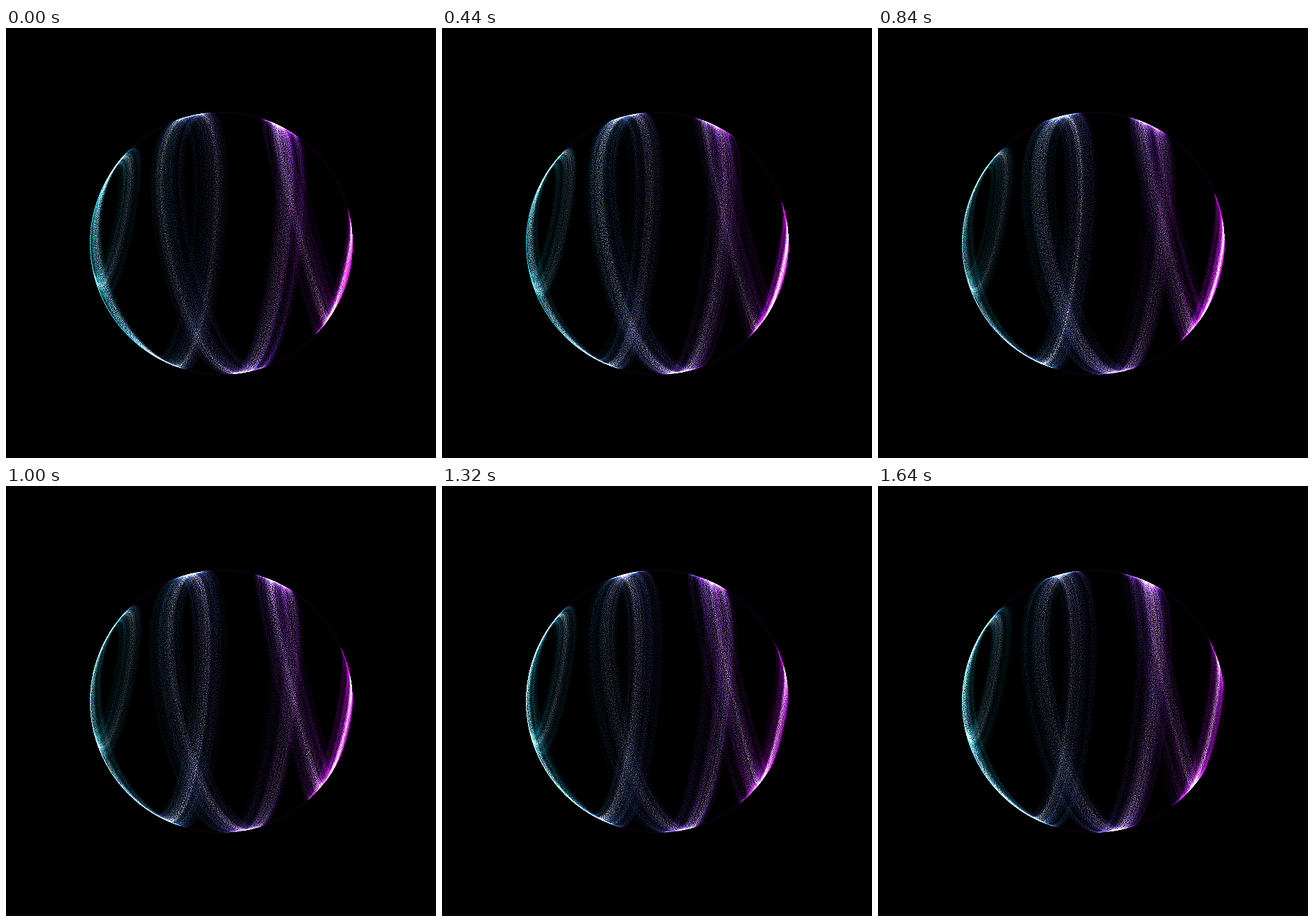
An HTML page with a canvas for the animation above (1680 ms loop, 620 by 620 pixels).

```html
<!DOCTYPE html>
<html lang="en">
<head>
<meta charset="utf-8">
<title>Particle sphere</title>
<style>
html, body { margin: 0; width: 100%; height: 100%; overflow: hidden; background: #000; }
canvas { display: block; }
</style>
</head>
<body>
<canvas id="stage" width="620" height="620"></canvas>
<script>
const SIZE = 620, CENTER = 310, RADIUS = 189, LOOP = 1680, STEP = 40;
const STRANDS = 52, SAMPLES = 300, GAIN = .5;
const ctx = document.getElementById('stage').getContext('2d');
const image = ctx.createImageData(SIZE, SIZE);
const light = new Float32Array(SIZE * SIZE * 3);

// A ribbon winds round the sphere and meets the rim at these angles,
// in turn below and above the middle. Bulges lean right (+) or left (-).
const rimAngles = [165, 142, 114, 103, 78, 63, 34, 5];
const bulges = [.4, -.6, .3, -.46, .24, -.08, .16];

let seed;
function random() {
  seed = (Math.imul(seed, 1664525) + 1013904223) >>> 0;
  return seed / 4294967296;
}

function plot(x, y, r, g, b) {
  const scale = RADIUS / Math.max(1, Math.hypot(x, y));
  const k = 3 * (Math.round(CENTER + y * scale) * SIZE + Math.round(CENTER + x * scale));
  light[k] += r;
  light[k + 1] += g;
  light[k + 2] += b;
}

// Rim point and its rightward tangent for ribbon offset u (-1 to 1).
function contact(k, u, phase) {
  const spread = 7 + .08 * k * k;
  const turn = 14 * phase * (k / 7) ** 3;
  const angle = (rimAngles[k] + turn - u * spread) * Math.PI / 180;
  const x = Math.cos(angle), y = Math.sin(angle), side = k % 2 ? -1 : 1;
  return { x, y: y * side, tx: y, ty: -x * side };
}

function bezier(a, b, c, d, t) {
  const s = 1 - t;
  return s * s * s * a + 3 * s * s * t * b + 3 * s * t * t * c + t * t * t * d;
}

// Cyan on the left to magenta on the right, paler on bright ridges.
function shade(x, pale) {
  const t = Math.max(0, (x + 1) / 2);
  const mix = (value, grey) => value + (grey - value) * pale;
  return [mix(20 + 150 * t ** 1.3, 125), mix(135 * (1 - t ** 1.2), 115), mix(150 + 50 * t, 130)];
}

function drawTurn(k, phase) {
  const level = GAIN * (k ? .9 + .2 * Math.sin(k * 2 + 6 * phase) : .4);
  const ridge = .4 * Math.sin(1.9 * k * k + 4 * phase);
  for (let i = 0; i < STRANDS; i++) {
    const u = 2 * i / (STRANDS - 1) - 1;
    const a = contact(k, u, phase), b = contact(k + 1, u, phase), h = bulges[k];
    const peak = Math.exp(-(((u - ridge) / .35) ** 2));
    const ripple = .5 + .5 * Math.sin(u * 10 + k * 2 + 9 * phase);
    const edge = Math.sqrt(1.05 - u * u);
    const weight = level * edge * (.2 + .35 * ripple + .75 * peak) * (.5 + random());
    for (let n = 0; n < SAMPLES; n++) {
      const t = (n + random()) / SAMPLES;
      const x = bezier(a.x, a.x + h * a.tx, b.x + h * b.tx, b.x, t) + .008 * (random() - .5);
      const y = bezier(a.y, a.y + h * a.ty, b.y + h * b.ty, b.y, t);
      const [r, g, blue] = shade(x, .65 * peak);
      const tint = () => weight * (.3 + 1.2 * random());
      plot(x, y, r * tint(), g * tint(), blue * tint());
    }
  }
}

function draw(time) {
  light.fill(0);
  seed = 7;
  for (let i = 0; i < 1200; i++) {
    const angle = i * Math.PI / 600;
    plot(Math.cos(angle), Math.sin(angle), 24, 2, 32);
  }
  bulges.forEach((_, k) => drawTurn(k, time / LOOP));
  for (let i = 0; i < SIZE * SIZE; i++) {
    const floor = i >= 616 * SIZE;
    image.data[4 * i] = light[3 * i] + (floor ? 9 : 0);
    image.data[4 * i + 1] = light[3 * i + 1];
    image.data[4 * i + 2] = light[3 * i + 2] + (floor ? 5 : 0);
    image.data[4 * i + 3] = 255;
  }
  ctx.putImageData(image, 0, 0);
}

let shown = -1;
function tick() {
  const time = Math.floor(performance.now() % LOOP / STEP) * STEP;
  if (time !== shown) draw(shown = time);
  requestAnimationFrame(tick);
}
tick();
</script>
</body>
</html>
```
